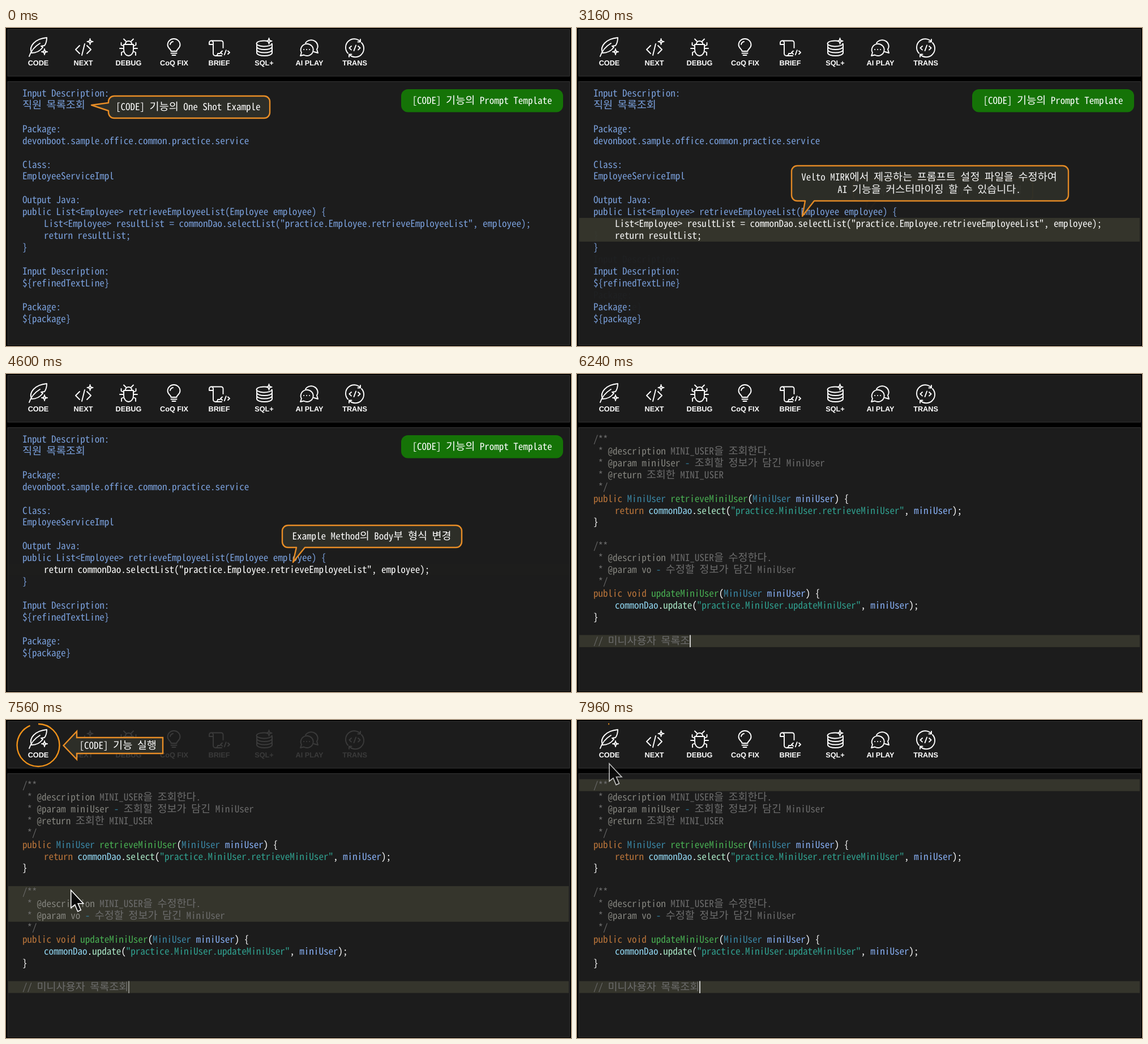
An HTML page that plays this animation: 998x561 px, repeating every 8000 ms.

```html
<!DOCTYPE html>
<html lang="ko">
<head>
<meta charset="utf-8">
<style>
html, body { margin: 0; width: 100%; height: 100%; overflow: hidden; background: #000; }
svg { display: block; width: 100vw; height: 100vh; }
text { white-space: pre; text-rendering: geometricPrecision; }
.mono { font: 17.05px "Noto Sans Mono CJK KR", "Noto Sans Mono CJK JP", "Noto Sans Mono CJK SC", "Liberation Mono", "Noto Sans CJK KR", monospace; font-feature-settings: "calt" 0, "locl" 0; fill: #fff; }
.hangul { font-size: 18.53px; }
.label { font: bold 12.7px "Liberation Sans", Arial, sans-serif; fill: #fff; text-anchor: middle; }
.icon { fill: none; stroke: #fff; stroke-width: 1.9; stroke-linejoin: round; stroke-linecap: round; }
.panel { fill: #1c1c1c; stroke: #343434; }
.band { fill: #35352c; }
.callout { fill: #2d2e28; stroke: #e88d26; stroke-width: 2.4; stroke-linejoin: round; }
</style>
</head>
<body>
<svg id="stage" viewBox="0 0 998 561"></svg>
<script>
const LEFT = 29, COL = 8.525, ROW = 20.95, TOP = 104.5;
const COLORS = {
  b: '#7aa0dc', w: '#ffffff', c: '#6c6c6c', a: '#84847e', d: '#2f7d9c', k: '#b9743a',
  t: '#3a86a4', f: '#48ae52', o: '#90d5f0', m: '#a8e6c4', s: '#30a08f', p: '#86aef2'
};
// Korean syllables are set a little larger, so that one fills two columns.
const markup = s => s.replace(/&/g, '&amp;').replace(/</g, '&lt;')
  .replace(/[가-힣]+/g, '<tspan class="hangul">$&</tspan>');
const rowTop = row => TOP + row * ROW;
const group = (id, content) => `<g id="${id}">${content}</g>`;
const band = (row, count, id = '') =>
  `<rect id="${id}" class="band" x="4" y="${rowTop(row)}" width="990" height="${count * ROW}"/>`;
const mono = (x, y, s, anchor = 'start') =>
  `<text class="mono" x="${x}" y="${y}" text-anchor="${anchor}">${markup(s)}</text>`;

// In a line, "~" plus a letter switches the colour; a leading tab indents.
function code(firstRow, base, lines) {
  return lines.map((line, i) => {
    const indent = line.startsWith('\t') ? 38 : 0;
    const spans = ('~' + base + line.replace('\t', '')).split('~').slice(1)
      .map(s => `<tspan fill="${COLORS[s[0]]}">${markup(s.slice(1))}</tspan>`).join('');
    return `<text class="mono" x="${LEFT + indent}" y="${rowTop(firstRow + i) + 16.3}">${spans}</text>`;
  }).join('');
}

function callout(x, y, w, h, { left = '', bottom = '' }) {
  const r = 10, arc = (dx, dy) => `a${r} ${r} 0 0 1 ${dx} ${dy}`;
  return `<path class="callout" d="M${x + r} ${y}h${w - 2 * r}${arc(r, r)}v${h - 2 * r}${arc(-r, r)}
    ${bottom}H${x + r}${arc(-r, -r)}${left}V${y + r}${arc(r, -r)}Z"/>`;
}

const sparkle = (x, y, r) =>
  `M${x} ${y - r}Q${x} ${y} ${x + r} ${y}Q${x} ${y} ${x} ${y + r}Q${x} ${y} ${x - r} ${y}Q${x} ${y} ${x} ${y - r}Z`;
const tag = (x, y, s) =>
  `M${x - s} ${y - s * .5}l${-s * .6} ${s * .55}l${s * .6} ${s * .55}M${x + s * .35} ${y - s * .75}l${-s * .6} ${s * 1.6}` +
  `M${x + s} ${y - s * .5}l${s * .6} ${s * .55}l${-s * .6} ${s * .55}`;

const TOOLS = [
  ['CODE', 57, 'M41 50C44 41 50 33 60 27M45 44C40 32 51 19 72 17C72 23 71 27 68 31L62 32L65 34C60 41 53 44 45 44Z' + sparkle(68, 42, 5)],
  ['NEXT', 136.5, 'M130 31L123 38L130 45M139 28L134 48M143 31L150 38L143 45' + sparkle(148.5, 24, 5)],
  ['DEBUG', 216.5, 'M208 29H225V38a8.5 11 0 0 1 -17 0ZM210.5 29a6 6 0 0 1 12 0M208 19.5l4.5 4.5M225 19.5l-4.5 4.5' +
    'M208 36H201M225 36H232M208 32l-4.5 -2v-4M225 32l4.5 -2v-4M208.5 41l-4.5 2v5M224.5 41l4.5 2v5'],
  ['CoQ FIX', 297, 'M291.5 41C291.5 37 285.5 36 285.5 29.5a11 10.5 0 0 1 22 0C307.5 36 301.5 37 301.5 41ZM291.5 44.5h10M293.5 48h6M290 29a6.5 6 0 0 1 5 -5'],
  ['BRIEF', 376.5, 'M366 29h-7v-3a3.5 3.5 0 0 1 7 0v19a4 4 0 0 0 4 4h11M363 22.5h17a3.5 3.5 0 0 1 3.5 3.5v9M370 49a4 4 0 0 0 4 -4h4' + tag(387, 43, 5)],
  ['SQL+', 456, 'M460 22.7A13.5 5 0 1 0 469.5 27.5M443 28v16a13.5 5 0 0 0 27 0v-16M443 33a13.5 5 0 0 0 27 0M443 38.5a13.5 5 0 0 0 27 0' + sparkle(464.5, 23, 5)],
  ['AI PLAY', 536, 'M520 49l2 -5.5a11 10.5 0 1 1 4 4ZM529 26.5a11.5 10.5 0 1 1 20 11l2 6.5l-7 -2M526 38h.2M531 38h.2M536 38h.2'],
  ['TRANS', 616, 'M604 44.5A15 15 0 0 1 626 24M628 26A15 15 0 0 1 606 46.5M626 20v4.5h-4.5M606 51v-4.5h4.5' + tag(616, 35, 6)]
];
const tool = ([name, x, d]) => `<path class="icon" d="${d}"/><text class="label" x="${x}" y="66">${name}</text>`;

const tail = ['}', '', 'Input Description:', '${refinedTextLine}', '', 'Package:', '${package}'];
const body = [
  '\tList<Employee> resultList = commonDao.selectList("practice.Employee.retrieveEmployeeList", employee);',
  '\treturn resultList;'
];
const typed = '// 미니사용자 목록조회';

const template = group('template',
  code(0, 'b', ['Input Description:', '직원 목록조회', '', 'Package:', 'devonboot.sample.office.common.practice.service', '',
    'Class:', 'EmployeeServiceImpl', '', 'Output Java:', 'public List<Employee> retrieveEmployeeList(Employee employee) {']) +
  group('plainBody', code(11, 'b', body)) +
  group('focusBody', band(11, 2) + code(11, 'w', body)) +
  group('oldTail', code(13, 'b', tail)) +
  band(11, 1, 'newBand') +
  group('newBody', code(11, 'w', ['\treturn commonDao.selectList("practice.Employee.retrieveEmployeeList", employee);']) + code(12, 'b', tail)) +
  '<rect x="698" y="108" width="286" height="40.5" rx="12" fill="#157307"/>' +
  mono(717.5, 134, '[CODE] 기능의 Prompt Template') +
  group('note1', callout(181, 120, 285, 39, { left: 'V146L151 136L181 132' }) + mono(194, 145, '[CODE] 기능의 One Shot Example')) +
  group('note2', callout(379, 243, 489, 62, { bottom: 'H419L398 332L403 305' }) +
    mono(622, 269, 'Velto MIRK에서 제공하는 프롬프트 설정 파일을 수정하여', 'middle') +
    mono(622, 290.5, 'AI 기능을 커스터마이징 할 수 있습니다.', 'middle')) +
  group('note3', callout(488, 267, 317, 39, { bottom: 'H528L507 332L513 306' }) +
    mono(505.5, 292, 'Example Method의 Body부 형식 변경')));

const editor = group('editor',
  band(17, 1) + band(17, 1, 'hoverBand') +
  code(0, 'c', [
    '/**',
    ' * ~a@description ~cMINI_USER을 조회한다.',
    ' * ~a@param miniUser ~d- ~c조회할 정보가 담긴 MiniUser',
    ' * ~a@return ~c조회한 MINI_USER',
    ' */',
    '~kpublic ~tMiniUser ~fretrieveMiniUser~w(~tMiniUser ~pminiUser~w) {',
    '\t~kreturn ~ocommonDao~w.~mselect~w(~s"practice.MiniUser.retrieveMiniUser"~w, ~pminiUser~w);',
    '~w}',
    '',
    '/**',
    ' * ~a@description ~cMINI_USER을 수정한다.',
    ' * ~a@param vo ~d- ~c수정할 정보가 담긴 MiniUser',
    ' */',
    '~kpublic void ~fupdateMiniUser~w(~tMiniUser ~pminiUser~w) {',
    '\t~ocommonDao~w.~mupdate~w(~s"practice.MiniUser.updateMiniUser"~w, ~pminiUser~w);',
    '~w}'
  ]) +
  `<text id="typing" class="mono" x="${LEFT}" y="${rowTop(17) + 16.3}" style="fill:${COLORS.c}"></text>` +
  '<rect id="caret" y="460.5" width="1.5" height="21.5" fill="#fff"/>');

document.getElementById('stage').innerHTML =
  '<rect width="998" height="561"/><rect class="panel" x="3" y="2.5" width="992.5" height="82.5"/>' +
  '<rect class="panel" x="3" y="94.5" width="992.5" height="464.5"/>' +
  template + editor + tool(TOOLS[0]) + group('otherTools', TOOLS.slice(1).map(tool).join('')) +
  group('arrow', '<path class="callout" style="stroke-linejoin:miter" d="M102.5 45L126 20V31H278V59H126V69.5Z"/>' + mono(130.5, 50.5, '[CODE] 기능 실행')) +
  '<circle id="ring" cx="57" cy="44.5" r="37.5" fill="none" stroke="#f0921a" stroke-width="2.4" pathLength="100" transform="rotate(-90 57 44.5)"/>' +
  '<path id="mouse" d="M0 0V31L7 25.5L12 37.5L17.5 35L12.5 23.5H22Z" fill="#0a0a0a" stroke="#fff" stroke-width="1.6"/>';

const el = Object.fromEntries([...document.querySelectorAll('[id]')].map(e => [e.id, e]));
const clamp = (v, lo = 0, hi = 1) => Math.min(hi, Math.max(lo, v));
const ramp = (t, from, length) => clamp((t - from) / length);
const smooth = u => u * u * (3 - 2 * u);
const fade = (t, from, length) => smooth(ramp(t, from, length));
const show = (name, opacity) => el[name].setAttribute('opacity', opacity);
const set = (name, attrs) => { for (const k in attrs) el[name].setAttribute(k, attrs[k]); };
const bezier = (a, b, c, u) => a * (1 - u) ** 2 + 2 * b * u * (1 - u) + c * u * u;

function render(t) {
  const focus = fade(t, 1200, 400), edit = fade(t, 3120, 400), next = fade(t, 5440, 400);
  show('note1', 1 - focus);
  show('plainBody', 1 - focus);
  show('focusBody', focus * (1 - edit));
  show('note2', focus * (1 - edit));
  show('oldTail', 1 - edit);
  show('newBody', edit);
  show('note3', edit);
  show('newBand', fade(t, 4560, 360));
  show('template', 1 - next);
  show('editor', next);

  const text = typed.slice(0, clamp(Math.floor((t - 6075) * .075), 0, typed.length));
  const columns = [...text].reduce((n, ch) => n + (ch >= '가' ? 2 : 1), 0);
  el.typing.innerHTML = markup(text);
  set('caret', { x: LEFT + columns * COL - .3 });
  show('caret', t < 6260 ? 1 : .5 + .5 * Math.cos((t - 6260) / 1700 * 2 * Math.PI));

  const dim = fade(t, 6280, 400) * (1 - fade(t, 7560, 400));
  show('otherTools', 1 - .87 * dim);
  show('arrow', dim);
  set('arrow', { transform: `translate(${-ramp(t, 6800, 760)} 0)` });

  const ringStart = ramp(t, 7570, 394) * 100, ringEnd = ramp(t, 7130, 460) * 100;
  set('ring', { 'stroke-dasharray': `${Math.max(0, ringEnd - ringStart)} 200`, 'stroke-dashoffset': -ringStart });
  show('ring', ringEnd > ringStart ? 1 : 0);

  const path = fade(t, 7160, 800);
  const x = bezier(217, 93, 57, path), y = bezier(461, 333, 77, path);
  set('mouse', { transform: `translate(${x} ${y})` });
  show('mouse', fade(t, 6680, 200) * (1 - fade(t, 7920, 120)));

  // Rows touched by the pointer light up.
  const rowAt = py => clamp(Math.floor((py - TOP) / ROW), 0, 17);
  const first = rowAt(y), last = rowAt(y + 38);
  set('hoverBand', { y: rowTop(first), height: (last - first + 1) * ROW });
}

const start = performance.now();
function tick() {
  render((performance.now() - start) % 8000);
  requestAnimationFrame(tick);
}
render(0);
requestAnimationFrame(tick);
</script>
</body>
</html>
```
